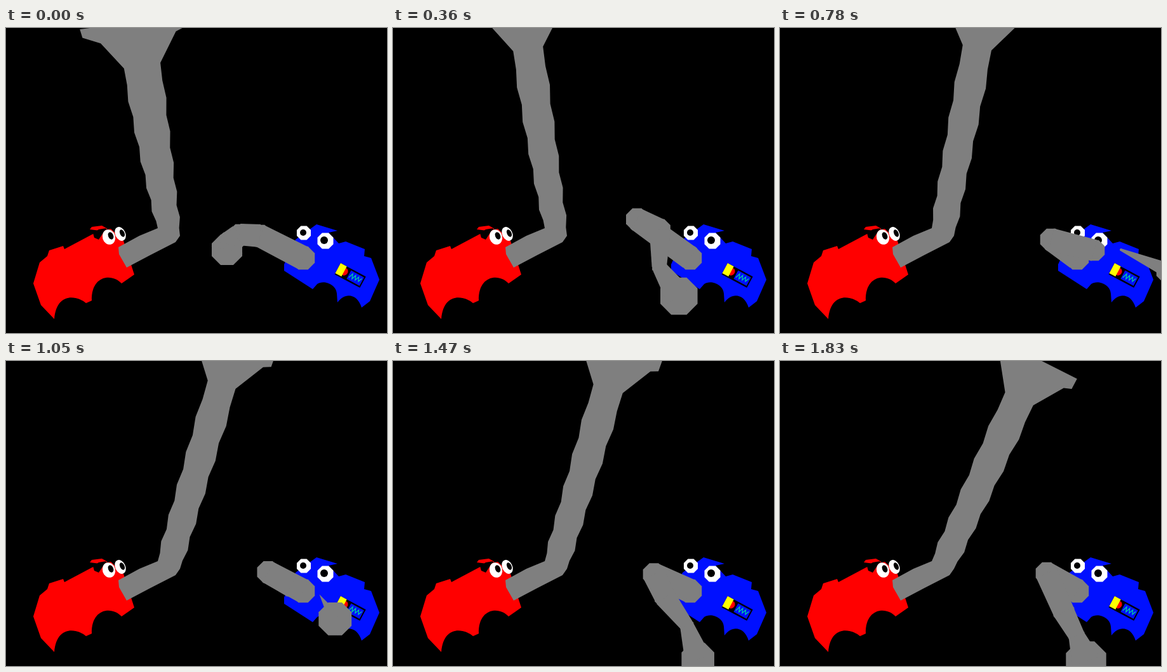
An HTML page with a canvas that plays this animation: 600 px wide and 480 px high, repeating every 1930 ms.

```html
<!DOCTYPE html>
<html lang="en">
<head>
<meta charset="utf-8">
<title>Swinging trunks</title>
<style>
html, body { margin: 0; width: 100%; height: 100%; overflow: hidden; background: #000; }
canvas { display: block; }
</style>
</head>
<body>
<canvas id="stage" width="600" height="480"></canvas>
<script>
const ctx = document.getElementById('stage').getContext('2d');
const LOOP = 1930, STEP = 30, LAST = 1830;
const GREY = '#7f7f7f', RED = '#ff0000', BLUE = '#0010ff';

// Each part is a corner [x, y] or a curve [cx1, cy1, cx2, cy2, x, y]
function shape(color, ...parts) {
  ctx.beginPath();
  for (const p of parts) p.length > 2 ? ctx.bezierCurveTo(...p) : ctx.lineTo(...p);
  ctx.closePath();
  ctx.fillStyle = color;
  ctx.fill();
}

function oval(x, y, rx, ry, turn, color) {
  ctx.beginPath();
  ctx.ellipse(x, y, rx, ry, turn, 0, Math.PI * 2);
  ctx.fillStyle = color;
  ctx.fill();
}

// Octagon with one side facing up
function knob(x, y, r, color) {
  const corners = Array.from({ length: 8 }, (_, i) => {
    const a = (i + .5) * Math.PI / 4;
    return [x + r * 1.04 * Math.cos(a), y + r * 1.04 * Math.sin(a)];
  });
  shape(color, ...corners);
}

// Smooth curve through unevenly timed poses: [time, v0, v1, ...]
function pose(keys, t) {
  const end = keys.length - 1;
  let i = 0;
  while (i < end - 1 && t >= keys[i + 1][0]) i++;
  const a = keys[i], b = keys[i + 1];
  const p = keys[Math.max(0, i - 1)], n = keys[Math.min(end, i + 2)];
  const d = b[0] - a[0], u = (t - a[0]) / d, u2 = u * u, u3 = u2 * u;
  return a.map((v, k) => {
    const m0 = (b[k] - p[k]) / (b[0] - p[0]) * d;
    const m1 = (n[k] - v) / (n[0] - a[0]) * d;
    return (2 * u3 - 3 * u2 + 1) * v + (u3 - 2 * u2 + u) * m0
      + (3 * u2 - 2 * u3) * b[k] + (u3 - u2) * m1;
  }).slice(1);
}

// Long trunk: time, lean from upright, length
const swing = [
  [0, -.158, 264],
  [90, -.24, 271],
  [210, -.19, 284],
  [510, -.087, 294],
  [780, .186, 294],
  [1290, .327, 294],
  [1620, .272, 284],
  [1830, .434, 287]
];

function longTrunk(t) {
  const [lean, length] = pose(swing, t);
  const sin = Math.sin(lean), cos = Math.cos(lean);
  const half = 23 + (294 - length) * .2;   // thicker when squashed
  const top = (across, up) => [
    256 + sin * (length + up) + cos * across,
    320 - cos * (length + up) + sin * across
  ];

  // Ribs alternate in and out, wider apart towards the top
  function edge(foot, head, side) {
    const out = [foot];
    for (let k = 1; k < 12; k++) {
      const s = (k / 12) ** 1.25;
      const bow = Math.min(0, lean) * 12 * Math.sin(Math.PI * s);
      const bulge = (k % 2 ? 0 : 3.2) * side + bow * (side < 0);
      out.push([
        foot[0] + (head[0] - foot[0]) * s + cos * bulge,
        foot[1] + (head[1] - foot[1]) * s + sin * bulge
      ]);
    }
    return [...out, head];
  }

  shape(GREY,
    ...edge([239, 315], top(-half, 0), -1),
    top(-half - 30, 45), top(-half - 57, 58), top(-half - 59, 72),
    top(half + 45, 67), top(half + 44, 49), top(half + 32, 45),
    ...edge([274, 327], top(half, 0), 1).reverse(),
    [267, 337], [226, 358], [190, 377], [178, 356], [177, 345], [210, 327]);
}

// Loose trunk: time, three joints, centre of the end, neck and end radius
const flop = [
  [0, 400, 327, 368, 325, 350, 340, 348, 349, 19, 25],
  [210, 349, 280, 356, 316, 336, 337, 298, 355, 9, 27],
  [510, 426, 329, 486, 323, 506, 407, 606, 474, 14, 32],
  [780, 427, 333, 495, 350, 537, 349, 612, 382, 2, 20],
  [1290, 403, 332, 413, 358, 455, 396, 448, 445, 1, 33],
  [1620, 420, 338, 449, 385, 475, 430, 517, 484, 19, 22],
  [1830, 420, 334, 447, 395, 467, 432, 482, 473, 13, 33]
];

function link([ax, ay, ar], [bx, by], br) {
  const dx = bx - ax, dy = by - ay, d = Math.hypot(dx, dy) || 1;
  const nx = -dy / d, ny = dx / d;
  shape(GREY, [ax + nx * ar, ay + ny * ar], [bx + nx * br, by + ny * br],
    [bx - nx * br, by - ny * br], [ax - nx * ar, ay - ny * ar]);
}

function looseTrunk(t) {
  const [ax, ay, bx, by, cx, cy, ex, ey, thin, end] = pose(flop, t);
  const neck = Math.max(0, thin);
  const joints = [[468, 362, 19], [ax, ay, 18], [bx, by, 17], [cx, cy, neck], [ex, ey, end]];
  joints.forEach((b, i) => {
    knob(...b, GREY);
    // a very thin neck tears away from the joint before it
    if (i && b[2] >= 3) link(joints[i - 1], b, Math.min(b[2], joints[i - 1][2] + 10));
  });
}

function redBody() {
  shape(RED, [65, 359], [68, 350], [90, 343], [92, 348], [141, 322], [165, 316],
    [185, 335], [202, 388], [182, 402], [168, 386, 134, 388, 135, 429],
    [126, 433], [113, 422, 80, 414, 76, 458], [55, 436], [43, 402], [53, 369]);
  shape(RED, [132, 317], [135, 313], [151, 311], [160, 316], [148, 319]);
  shape('#000', [137, 323], [146, 317], [158, 315], [146, 333], [139, 330]);
  oval(162, 329, 10, 12, -.3, '#fff');
  oval(165, 327, 4, 6, -.4, '#000');
  oval(180, 324, 8, 11.5, -.45, '#fff');
  oval(183, 323, 3.5, 6, -.45, '#000');
}

function gadget() {
  ctx.save();
  ctx.translate(527, 370);
  ctx.rotate(.49);
  ctx.fillStyle = '#000';
  ctx.fillRect(0, 0, 45, 20);
  oval(12, 9, 5, 6, 0, RED);
  ctx.fillStyle = '#ffff00';
  ctx.fillRect(0, 0, 11, 18);
  ctx.fillStyle = BLUE;
  ctx.fillRect(20, 2.5, 23, 15);
  ctx.beginPath();
  for (let i = 0; i < 8; i++) ctx.lineTo(22 + i * 2.7, i % 2 ? 6 : 14 - i * .3);
  ctx.strokeStyle = '#00d0a0';
  ctx.lineWidth = 1.3;
  ctx.stroke();
  ctx.restore();
}

function blueBody() {
  shape(BLUE, [438, 372], [456, 333], [489, 309], [522, 319], [508, 322], [524, 339],
    [535, 336], [565, 348], [564, 359], [575, 362], [588, 396], [573, 430], [560, 440],
    [553, 417, 533, 416, 522, 432], [521, 418], [520, 403, 500, 396, 490, 403],
    [483, 411], [438, 382]);
  knob(469, 322.5, 11.5, '#fff');
  oval(468, 322, 5, 5, 0, '#000');
  knob(503, 335, 13, '#fff');
  oval(501, 334, 6, 6, 0, '#000');
  gadget();
}

function draw(t) {
  ctx.fillStyle = '#000';
  ctx.fillRect(0, 0, 600, 480);
  redBody();
  longTrunk(t);
  blueBody();
  looseTrunk(t);
}

const start = performance.now();
function tick() {
  const ms = (performance.now() - start) % LOOP;
  draw(Math.min(LAST, Math.floor(ms / STEP) * STEP));
  requestAnimationFrame(tick);
}
tick();
</script>
</body>
</html>
```
